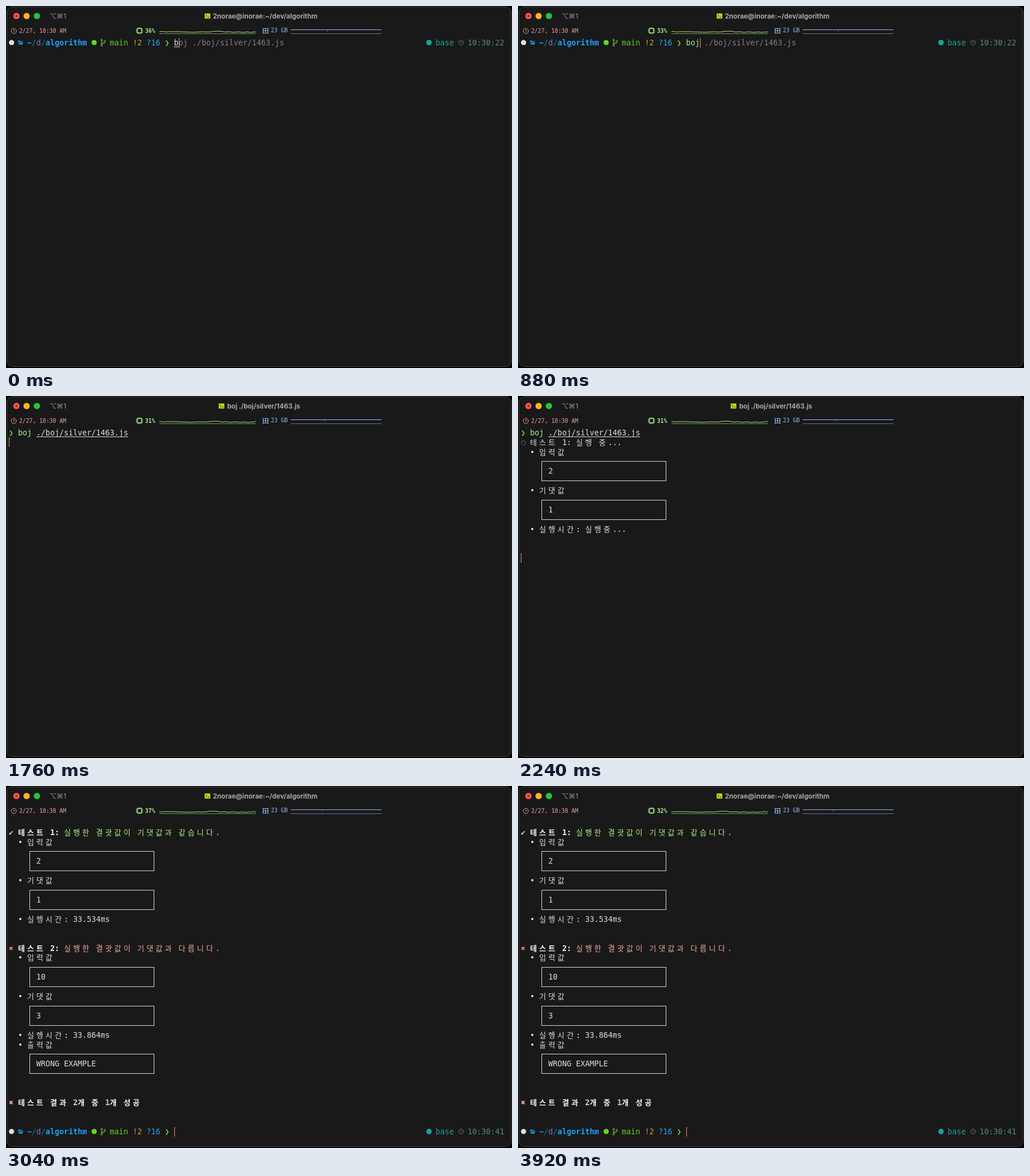
Animation of 884x634 px, one loop 4000 ms. Source, as an HTML page:

```html
<!DOCTYPE html>
<html lang="ko">
<head>
<meta charset="utf-8">
<title>Terminal test run</title>
<style>
  html, body { margin: 0; width: 100%; height: 100%; overflow: hidden; background: #000; }
  svg { display: block; width: 884px; height: 634px; }
  .term { font: 13.31px "DejaVu Sans Mono", "Noto Sans CJK KR", "Noto Sans CJK", monospace; }
  .term .wide { font-family: "Noto Sans CJK KR", "Noto Sans CJK", sans-serif; font-size: 13px; }
  .stat { font: 9.75px "DejaVu Sans Mono", monospace; }
  .bar { font: 700 11.6px Inter, sans-serif; fill: #a8a8a8; }
  .bold { font-weight: 700; }
</style>
</head>
<body>
<svg id="stage" viewBox="0 0 884 634"></svg>
<script>
const LOOP = 4000, COL = 8.015, ROW = 16.91, LEFT = 5, BASE = 68.7;
const C = {
  text: '#dedede', white: '#f4f4f4', dim: '#808080', lime: '#a9ee82', green: '#5fd72a',
  red: '#f2705f', pink: '#f0a79e', teal: '#1f9f98', cursor: '#e4957e', blue: '#93b8ee'
};
const stage = document.getElementById('stage');

function add(parent, tag, attrs = {}, text) {
  const node = document.createElementNS('http://www.w3.org/2000/svg', tag);
  for (const key in attrs) node.setAttribute(key, attrs[key]);
  if (text !== undefined) node.textContent = text;
  parent.appendChild(node);
  return node;
}
const line = (parent, d, stroke, width = 1, more = {}) =>
  add(parent, 'path', { d, stroke, fill: 'none', 'stroke-width': width, ...more });
const disc = (parent, cx, cy, r, fill) => add(parent, 'circle', { cx, cy, r, fill });
const colX = col => LEFT + col * COL;
const midY = row => 64 + row * ROW;

// Puts text on the character grid; Hangul takes two columns.
function put(parent, row, col, text, fill, bold) {
  for (const run of text.match(/[가-힣]+|[^가-힣]+/g)) {
    const wide = /[가-힣]/.test(run), step = wide ? 2 : 1;
    if (run.trim()) {
      const skip = run.length - run.trimStart().length;
      const shown = run.trim();
      const x = [...shown].map((_, i) => colX(col + (skip + i) * step).toFixed(2)).join(' ');
      add(parent, 'text', {
        x, y: (BASE + row * ROW).toFixed(2), fill,
        class: (wide ? 'wide ' : '') + (bold ? 'bold' : '')
      }, shown);
    }
    col += run.length * step;
  }
  return col;
}

function cursor(parent, row, col) {
  add(parent, 'rect', { x: Math.round(colX(col) + 0.4), y: Math.round(midY(row) - 8.5), width: 1, height: 17, fill: C.cursor });
}
function underline(parent, row, from, to) {
  line(parent, `M${colX(from)} ${Math.round(midY(row) + 7) + 0.5}H${colX(to)}`, C.text);
}
function clockIcon(parent, x, y, r, color) {
  add(parent, 'circle', { cx: x, cy: y, r, fill: 'none', stroke: color });
  line(parent, `M${x} ${y - r * 0.6}V${y}H${x + r * 0.5}`, color, 0.9);
}

// Window
add(stage, 'rect', { x: 1.5, y: 1.5, width: 881, height: 630, rx: 9, fill: '#191919', stroke: '#444' });
[[18.3, '#ff5349'], [36, '#fdb224'], [54, '#28c03e']].forEach(([x, fill]) => disc(stage, x, 17.5, 5.5, fill));
disc(stage, 18.3, 17.5, 1.6, '#7c120c');
add(stage, 'text', { x: 76, y: 22, style: 'font:500 12px Inter, "DejaVu Sans", sans-serif', fill: '#828282' }, '⌥⌘1');

// Shown layers: each has a list of [from, to) spans
const layers = [];
function layer(spans, draw, cls = 'term') {
  const g = add(stage, 'g', { class: cls });
  draw(g);
  layers.push({ g, spans });
}

function shellIcon(g, x) {
  add(g, 'rect', { x, y: 13, width: 10, height: 9, rx: 1, fill: '#b9d515' });
  line(g, `M${x + 2} 15l2 2l-2 2M${x + 5} 19.5h3`, '#30380a');
}
const HOME = '2norae@inorae:~/dev/algorithm';
const homeTitle = g => add(g, 'text', { x: 361.5, y: 21.7 }, HOME);
layer([[0, 1760], [2480, LOOP]], homeTitle, 'bar');
layer([[0, 1760], [2720, LOOP]], g => shellIcon(g, 347), 'bar');
layer([[2480, 2720]], g => disc(g, 352, 17.5, 5, '#5b9a38'), 'bar');
layer([[1760, 2480]], g => {
  shellIcon(g, 371.5);
  add(g, 'text', { x: 386.5, y: 21.7 }, 'boj ./boj/silver/1463.js');
}, 'bar');

// Status bar
const stat = add(stage, 'g', { class: 'stat' });
clockIcon(stat, 13.7, 43.7, 4.5, '#e79b95');
add(stat, 'text', { x: 23, y: 47, fill: '#eda29b' }, '2/27, 10:30 AM');
add(stat, 'rect', { x: 229.5, y: 39.5, width: 7.5, height: 7.5, fill: 'none', stroke: C.lime, 'stroke-width': 1.4 });
for (let i = 0; i < 3; i++) {
  const p = 231 + i * 2.3, q = 41 + i * 2.3;
  line(stat, `M${p} 37.5v2M${p} 47v2M227.2 ${q}h2M237.2 ${q}h2`, C.lime);
}
const cpuText = add(stat, 'text', { x: 243, y: 46.5, fill: C.lime, class: 'bold' });
line(stat, 'M448 39.5H459M448 47.5H459M449.5 39V48M457.5 39V48M453.5 39V48M448 43.5H459', C.blue, 1);
add(stat, 'text', { x: 462.7, y: 46.3, fill: C.blue }, '23 GB');
line(stat, 'M268 48.5H436.5', '#6c9b5a');
line(stat, 'M497.5 48.5H656', '#5d7698');
line(stat, 'M497.5 41.5H656', C.blue);

const clip = add(add(stage, 'defs'), 'clipPath', { id: 'graph' });
add(clip, 'rect', { x: 268, y: 36, width: 168.5, height: 14 });
const graph = add(add(stat, 'g', { 'clip-path': 'url(#graph)' }), 'polyline', {
  points: '262 45 268 45 275 44.6 280 45.6 284 45 300 45 316 45.6 330 46 343 45.2 352 45.6 358 45.2 365 44.2 375 44.2 382 45.6 390 45 397 46.2 405 45.2 414 46.3 421 45.4 428 46.3 434 45.4 437 46 440 44.2 443 45.8 446 45 450 46',
  fill: 'none', stroke: C.lime, 'stroke-width': 1
});
const notch = line(stat, 'M561.5 41.5v3', C.blue, 0.9, { opacity: 0.6 });

// Shell prompt
function prompt(g, row, time) {
  const y = midY(row);
  disc(g, 9.7, y, 4.6, '#dcdcdc');
  add(g, 'path', { d: `M21 ${y - 3.5}h3.5l1 1h3.5v1.6h-6l-2 3zM23.6 ${y - 0.2}h7l-2 4h-7z`, fill: '#1c87c2' });
  put(g, row, 4, '~', '#109ef2', true);
  put(g, row, 5, '/', '#1280b4');
  put(g, row, 6, 'd', '#7383ad');
  put(g, row, 7, '/', '#1280b4');
  put(g, row, 8, 'algorithm', '#17a5fb', true);
  disc(g, 154, y, 4.6, C.green);
  for (const [x, dy] of [[167, -4.5], [167, 4.8], [172.5, -2.5]])
    add(g, 'circle', { cx: x, cy: y + dy, r: 1.5, fill: 'none', stroke: C.green });
  line(g, `M167 ${y - 3}v6.2M172.5 ${y - 1}q0 2.5 -5.5 3`, C.green, 1.2);
  put(g, row, 22, 'main', '#5fcf2a');
  put(g, row, 27, '!2', '#d3a32c');
  put(g, row, 30, '?16', '#2b9ff0');
  put(g, row, 34, '❯', C.green);
  disc(g, 739, y, 4.8, C.teal);
  put(g, row, 93, 'base', C.teal);
  clockIcon(g, 795, y, 4.2, '#5a8585');
  put(g, row, 100, time, '#5a8585');
}

layer([[0, 1760]], g => prompt(g, 0, '10:30:22'));
const COMMAND = 'boj ./boj/silver/1463.js';
const typing = [[0, 1], [400, 2], [720, 3], [1360, COMMAND.length], [1760]];
typing.slice(0, -1).forEach(([from, n], i) => layer([[from, typing[i + 1][0]]], g => {
  const done = n >= 3;
  put(g, 0, 36, COMMAND.slice(0, Math.min(n, 3)), done ? C.lime : C.text);
  if (!done) underline(g, 0, 36, 36 + n);
  if (n > 3) {
    put(g, 0, 40, COMMAND.slice(4), C.text);
    underline(g, 0, 40, 60);
  } else put(g, 0, 36 + n, COMMAND.slice(n), C.dim);
  cursor(g, 0, 36 + n);
}));

layer([[1760, 2480]], g => {
  put(g, 0, 0, '❯', C.green);
  put(g, 0, 2, 'boj', C.lime);
  put(g, 0, 6, './boj/silver/1463.js', C.text);
  underline(g, 0, 6, 26);
});

// Test report
function bullet(g, row, text) {
  put(g, row, 2, '•', C.text);
  put(g, row, 4, text, C.text);
}
function boxed(g, row, label, value) {
  bullet(g, row, label);
  const top = Math.floor(midY(row + 1)) + 0.5, bottom = Math.floor(midY(row + 3)) + 0.5;
  add(g, 'rect', { x: 41.5, y: top, width: 217, height: bottom - top, fill: 'none', stroke: '#d8d8d8' });
  put(g, row + 2, 6, value, C.text);
}
function body(g, row, input, want, time) {
  boxed(g, row + 1, '입력값', input);
  boxed(g, row + 5, '기댓값', want);
  bullet(g, row + 9, '실행시간: ' + time);
}
function running(g, row, n, ...values) {
  add(g, 'circle', { cx: 9.4, cy: midY(row) + 1, r: 3.7, fill: 'none', stroke: '#8cc0e8', 'stroke-dasharray': '1.6 1.3' });
  put(g, row, 2, `테스트 ${n}: 실행 중...`, C.text);
  body(g, row, ...values, '실행중...');
}
function finished(g, row, n, passed, ...values) {
  put(g, row, 0, passed ? '✔' : '✖', passed ? C.lime : C.red);
  put(g, row, 2, `테스트 ${n}:`, C.white, true);
  put(g, row, 12, `실행한 결괏값이 기댓값과 ${passed ? '같' : '다릅'}${passed ? '습' : ''}니다.`, passed ? C.lime : C.pink);
  body(g, row, ...values);
}

layer([[1760, 2160]], g => cursor(g, 1, 0));
layer([[2160, 2400]], g => {
  running(g, 1, 1, '2', '1');
  cursor(g, 13, 0);
});
layer([[2400, LOOP]], g => finished(g, 1, 1, true, '2', '1', '33.534ms'));
layer([[2400, 2480]], g => {
  running(g, 13, 2, '10', '3');
  cursor(g, 25, 0);
});
layer([[2480, LOOP]], g => {
  finished(g, 13, 2, false, '10', '3', '33.864ms');
  boxed(g, 23, '출력값', 'WRONG EXAMPLE');
  put(g, 29, 0, '✖', C.pink);
  put(g, 29, 2, '테스트 결과', C.white, true);
  put(g, 29, 14, '2', '#b9d6ff', true);
  put(g, 29, 15, '개 중', C.white, true);
  put(g, 29, 21, '1', '#f4b9b1', true);
  put(g, 29, 22, '개 성공', C.white, true);
  prompt(g, 32, '10:30:41');
  cursor(g, 32, 36);
});

const cpu = [[0, 36], [600, 33], [1400, 31], [2800, 37], [3600, 32]];

function render(t) {
  for (const { g, spans } of layers)
    g.style.display = spans.some(([from, to]) => t >= from && t < to) ? '' : 'none';
  cpuText.textContent = cpu.filter(([from]) => t >= from).pop()[1] + '%';
  const shift = `translate(${-Math.floor(t / 200) * 0.56} 0)`;
  graph.setAttribute('transform', shift);
  notch.setAttribute('transform', shift);
}

const start = performance.now();
function tick() {
  render((performance.now() - start) % LOOP);
  requestAnimationFrame(tick);
}
tick();
</script>
</body>
</html>
```
